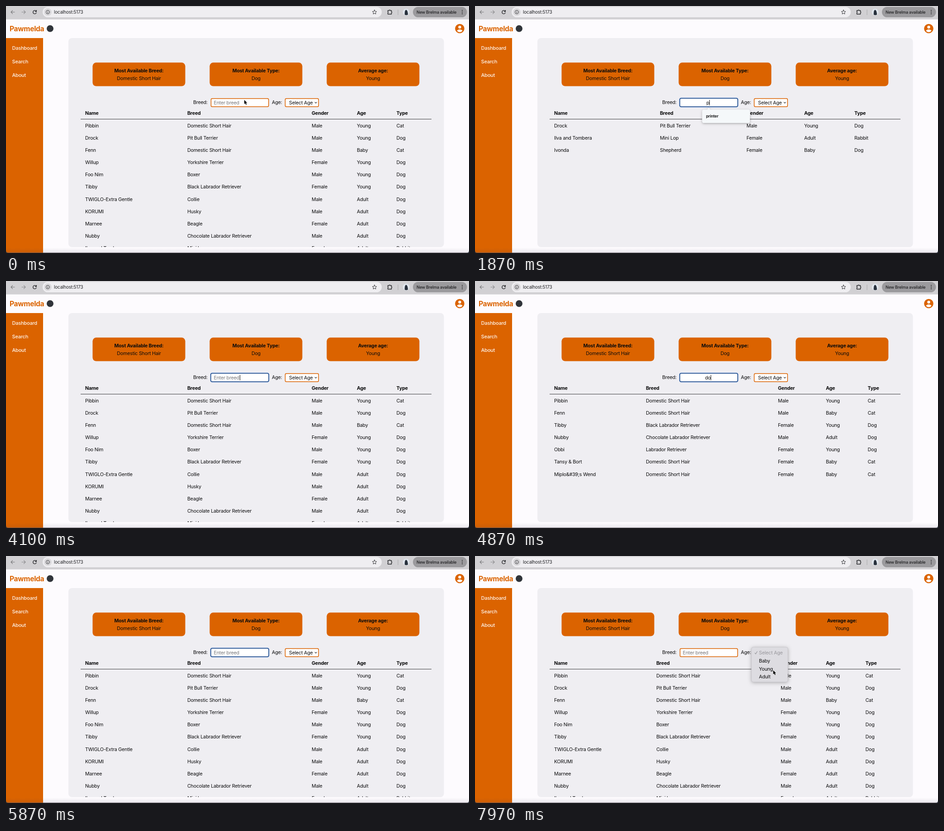
These frames come from a looping animation (1024x547 px, 8 s). An HTML page with a canvas:

```html
<!DOCTYPE html>
<html lang="en">
<head>
<meta charset="utf-8">
<title>Pet dashboard</title>
<style>
html, body { margin: 0; width: 100%; height: 100%; overflow: hidden; background: #fdfbfe; }
canvas { display: block; width: 1024px; height: 547px; }
</style>
</head>
<body>
<canvas id="stage"></canvas>
<script>
const W = 1024, H = 547, LOOP = 8000;
const ORANGE = '#db6300', PAGE = '#fdfbfe', PANEL = '#efeef2', INK = '#0b0b0c';
const canvas = document.getElementById('stage');
const ctx = canvas.getContext('2d');
const ratio = window.devicePixelRatio || 1;
canvas.width = W * ratio;
canvas.height = H * ratio;

const HEADERS = ['Name', 'Breed', 'Gender', 'Age', 'Type'];
const PETS = [
  'Pibbin|Domestic Short Hair|Male|Young|Cat',
  'Drock|Pit Bull Terrier|Male|Young|Dog',
  'Fenn|Domestic Short Hair|Male|Baby|Cat',
  'Willup|Yorkshire Terrier|Female|Young|Dog',
  'Foo Nim|Boxer|Male|Young|Dog',
  'Tibby|Black Labrador Retriever|Female|Young|Dog',
  'TWIGLO-Extra Gentle|Collie|Male|Adult|Dog',
  'KORUMI|Husky|Male|Adult|Dog',
  'Marnee|Beagle|Female|Adult|Dog',
  'Nubby|Chocolate Labrador Retriever|Male|Adult|Dog',
  'Ilva and Tombera|Mini Lop|Female|Adult|Rabbit',
  'Ivonda|Shepherd|Female|Baby|Dog',
  'Obbi|Labrador Retriever|Female|Young|Dog',
  'Tansy & Bort|Domestic Short Hair|Female|Baby|Cat',
  'Miplo&#39;s Wend|Domestic Short Hair|Female|Baby|Cat'
].map(line => line.split('|'));

// Column positions follow the widest remaining cells.
const COLUMNS = {
  '': [175, 401, 676, 776, 863.5],
  p: [175, 409, 600.5, 728, 839],
  pi: [175, 309, 541, 695.5, 830],
  d: [175, 378, 670, 776, 868.5]
};

const FOCUS = 600, OPEN = 6950;
const KEYS = [[FOCUS, ''], [1740, 'p'], [2040, 'pi'], [2240, 'pit'], [3500, 'pi'], [3680, 'p'],
  [3860, ''], [4330, 'd'], [4600, 'do'], [5180, 'd'], [5350, '']];
const POINTER = [[0, 527, 208], [300, 529, 210], [600, 530, 210], [6050, 530, 210], [6650, 652, 211],
  [7100, 653, 212], [7550, 657, 238], [7900, 659.5, 253]];

function text(str, x, y, { size = 10.7, weight = 400, color = INK, align = 'left' } = {}) {
  ctx.font = `${weight} ${size}px Inter, "Open Sans", sans-serif`;
  ctx.letterSpacing = `${-0.02 * size}px`;
  ctx.textAlign = align;
  ctx.fillStyle = color;
  ctx.fillText(str, x, y + size * 0.36);
}

function box(x, y, w, h, r, fill, stroke, line = 1) {
  ctx.beginPath();
  ctx.roundRect(x, y, w, h, r);
  if (fill) { ctx.fillStyle = fill; ctx.fill(); }
  if (stroke) { ctx.strokeStyle = stroke; ctx.lineWidth = line; ctx.stroke(); }
}

function disc(x, y, r, fill) {
  ctx.beginPath();
  ctx.arc(x, y, r, 0, Math.PI * 2);
  ctx.fillStyle = fill;
  ctx.fill();
}

function path(d, x, y, { fill, stroke, line = 1.2 } = {}) {
  const p = new Path2D(d);
  ctx.save();
  ctx.translate(x, y);
  ctx.lineWidth = line;
  ctx.lineJoin = ctx.lineCap = 'round';
  if (stroke) { ctx.strokeStyle = stroke; ctx.stroke(p); }
  if (fill) { ctx.fillStyle = fill; ctx.fill(p); }
  ctx.restore();
}

function withShadow(blur, draw) {
  ctx.save();
  ctx.shadowColor = 'rgba(0,0,0,.3)';
  ctx.shadowBlur = blur * ratio;
  ctx.shadowOffsetY = 1.5 * ratio;
  draw();
  ctx.restore();
}

function drawToolbar() {
  ctx.fillStyle = '#d1d0d3';
  ctx.fillRect(0, 0, W, 29);
  ctx.fillStyle = '#dedde0';
  ctx.fillRect(0, 29, W, 1);
  box(81, 2, 750, 23, 11.5, '#efeef1');
  const back = 'M4 0H-4M-.4-3.7L-4 0L-.4 3.7';
  path(back, 15, 13.5, { stroke: '#77777a', line: 1.1 });
  path('M-4 0H4M.4-3.7L4 0L.4 3.7', 39, 13.5, { stroke: '#8b8b8e', line: 1.1 });
  path('M3.4-1.6A3.8 3.8 0 1 0 3.6 1.4M3.8-4V-1.2H1', 63.5, 13.5, { stroke: '#202124', line: 1.3 });
  disc(92.5, 13.5, 8.5, '#dad9dc');
  path('M4 0A4 4 0 1 1-4 0A4 4 0 1 1 4 0M0-.2V2M0-1.9V-1.8', 92.5, 13.5, { stroke: '#303134', line: 1 });
  text('localhost:5173', 106, 13.5, { size: 10, color: '#202124' });
  path('M0-4.8L1.4-1.6L4.8-1.3L2.2 1L3 4.4L0 2.6L-3 4.4L-2.2 1L-4.8-1.3L-1.4-1.6Z', 815, 13.5,
    { stroke: '#38393c', line: 1 });
  path('M-4-3H-1.4A1.5 1.5 0 0 1 1.4-3H4V-.5A1.5 1.5 0 0 1 4 2.3V5H-4V2.2A1.5 1.5 0 0 0-4-.5Z', 848.5, 13,
    { stroke: '#27282b', line: 1.4 });
  ctx.fillStyle = '#a9a9ac';
  ctx.fillRect(866.5, 8, 1, 12);

  disc(885, 13.5, 7.5, '#dfe5ec');
  path('M-3.3 5.5Q-3.6-5 0-5Q3.4-4 4 5.5Q0 8-3.3 5.5Z', 885, 13.5, { fill: '#27303c' });

  box(900, 2, 119.5, 23, 11.5, '#9b9a9d');
  text('New Brelma available', 908, 13.8, { size: 9, weight: 500, color: '#1d1d1f' });
  [9.7, 13.5, 17.3].forEach(y => disc(1009, y, 1, '#1d1d1f'));
}

function drawPage() {
  ctx.fillStyle = PAGE;
  ctx.fillRect(0, 0, W, H);
  drawToolbar();

  text('Pawmelda', 8, 50.5, { size: 15.6, weight: 700, color: ORANGE });
  disc(97.5, 50, 7.5, '#30343a');
  disc(1003.5, 50, 10.3, ORANGE);
  disc(1003.5, 46.7, 3.2, PAGE);
  path('M-6.2 4.4Q-3.8 1.8 0 1.8T6.2 4.4Q3.8 7.9 0 7.9T-6.2 4.4Z', 1003.5, 50, { fill: PAGE });

  ctx.fillStyle = ORANGE;
  ctx.fillRect(0, 71, 82, H - 71);
  ['Dashboard', 'Search', 'About'].forEach((label, i) =>
    text(label, 13.5, 93 + i * 30, { size: 11, weight: 500, color: '#fff6ee' }));

  box(138, 71, 830.5, 463, 8, PANEL);
  [['Most Available Breed:', 'Domestic Short Hair'], ['Most Available Type:', 'Dog'], ['Average age:', 'Young']]
    .forEach(([title, value], i) => {
      const x = 191.5 + i * 258.9;
      box(x, 125.3, 205, 52.2, 8, ORANGE);
      text(title, x + 102.5, 143.3, { weight: 700, align: 'center' });
      text(value, x + 102.5, 159.8, { align: 'center' });
    });
}

function drawTable(query) {
  const columns = COLUMNS[query] || COLUMNS[query.startsWith('p') ? 'pi' : 'd'];
  HEADERS.forEach((label, i) => text(label, columns[i], 237.3, { weight: 700 }));
  ctx.fillStyle = '#3c3c3f';
  ctx.fillRect(165, 250, 776, 1);
  ctx.save();
  ctx.beginPath();
  ctx.rect(138, 251, 831, 283);
  ctx.clip();
  PETS.filter(pet => pet[1].toLowerCase().includes(query)).forEach((pet, row) =>
    pet.forEach((cell, i) => text(cell, columns[i], 265.1 + row * 27.1)));
  ctx.restore();
}

function drawForm(query, focused, caret) {
  text('Breed:', 414, 213);
  text('Age:', 588, 213);
  if (focused) {
    box(452.5, 204, 129, 19.5, 3.5, '#fff', '#a9c3ea', 2.4);
    box(453, 204.5, 128, 18.5, 3, '#fff', '#1b4787', 1.5);
  } else {
    box(453.5, 205, 127.3, 18, 2.5, '#fff', ORANGE, 1.5);
  }
  if (query) text(query, 515, 214.3, { align: 'center' });
  else text('Enter breed', 459.5, 214.3, { color: '#77777a' });
  if (caret) {
    const end = query ? 515 + ctx.measureText(query).width / 2 : 517;
    ctx.fillStyle = '#111';
    ctx.fillRect(end, 208, 1, 12);
  }
  box(617.5, 205, 73.8, 18, 2.5, '#fff', ORANGE, 1.5);
  text('Select Age', 626, 214.3);
  path('M-2-1L0 1.2L2-1', 685.2, 214, { stroke: '#222', line: 1.1 });
}

function drawSuggestion() {
  withShadow(5, () => {
    box(502.5, 229.5, 105.5, 29.5, 4, '#f5f8fa');
    path('M-4 0L0-4L4 0Z', 517, 229.7, { fill: '#f5f8fa' });
  });
  box(502.5, 229.5, 105.5, 29.5, 4, '#f5f8fa');
  text('printer', 511, 244.3, { size: 8.8, weight: 600 });
}

function drawMenu() {
  withShadow(8, () => box(611.5, 202, 80.5, 77, 4, '#dddce1'));
  box(611.5, 202, 80.5, 77, 4, '#dddce1', '#c3c2c7', 0.7);
  path('M-2.4.3L-.7 2.5L2.6-3', 621.5, 214.5, { stroke: '#929296', line: 1.1 });
  ['Select Age', 'Baby', 'Young', 'Adult'].forEach((label, i) =>
    text(label, 628, 214.5 + i * 17.7, { color: i ? INK : '#98979c' }));
}

function pointerAt(t) {
  const next = POINTER.findIndex(p => p[0] > t);
  if (next < 0) return POINTER[POINTER.length - 1].slice(1);
  const [t0, x0, y0] = POINTER[next - 1], [t1, x1, y1] = POINTER[next];
  const u = (t - t0) / (t1 - t0), k = u * u * (3 - 2 * u);
  return [x0 + (x1 - x0) * k, y0 + (y1 - y0) * k];
}

function drawPointer(t) {
  if (t > 850 && t < 6050) return;
  const [x, y] = pointerAt(t);
  const overInput = x > 453 && x < 581 && t > 250;
  if (overInput) {
    path('M-2-5Q0-5 0-3.5Q0-5 2-5M0-3.5V3.5M-2 5Q0 5 0 3.5Q0 5 2 5', x, y + 4, { stroke: '#222', line: 1 });
  } else {
    path('M0 0V9.2L2.1 7.3L3.7 10.7L5.3 10L3.8 6.6H6.5Z', x, y, { fill: '#080808', stroke: '#fff', line: 1.4 });
  }
}

function drawWindowEdge() {
  const shade = ctx.createLinearGradient(0, 535, 0, H);
  shade.addColorStop(0, 'rgba(60,50,80,0)');
  shade.addColorStop(1, 'rgba(60,50,80,.1)');
  ctx.fillStyle = shade;
  ctx.fillRect(0, 535, W, 12);
  ctx.fillStyle = '#55525a';
  ctx.fillRect(0, 546.2, W, 0.8);
  path('M0-6Q0 0 6 0H0Z', 0, H, { fill: '#28303c' });
  path('M0-6Q0 0-6 0H0Z', W, H, { fill: '#28303c' });
}

function render(t) {
  ctx.setTransform(ratio, 0, 0, ratio, 0, 0);
  const focused = t >= FOCUS && t < OPEN;
  const [since, query] = KEYS.filter(k => k[0] <= t).pop() || [0, ''];
  const caret = focused && (t - since) % 1000 < 500;
  drawPage();
  drawTable(query);
  drawForm(query, focused, caret);
  if (query === 'p' && t < 2040) drawSuggestion();
  if (t >= OPEN) drawMenu();
  drawPointer(t);
  drawWindowEdge();
}

const start = performance.now();
function tick() {
  render((performance.now() - start) % LOOP);
  requestAnimationFrame(tick);
}
tick();
</script>
</body>
</html>
```
